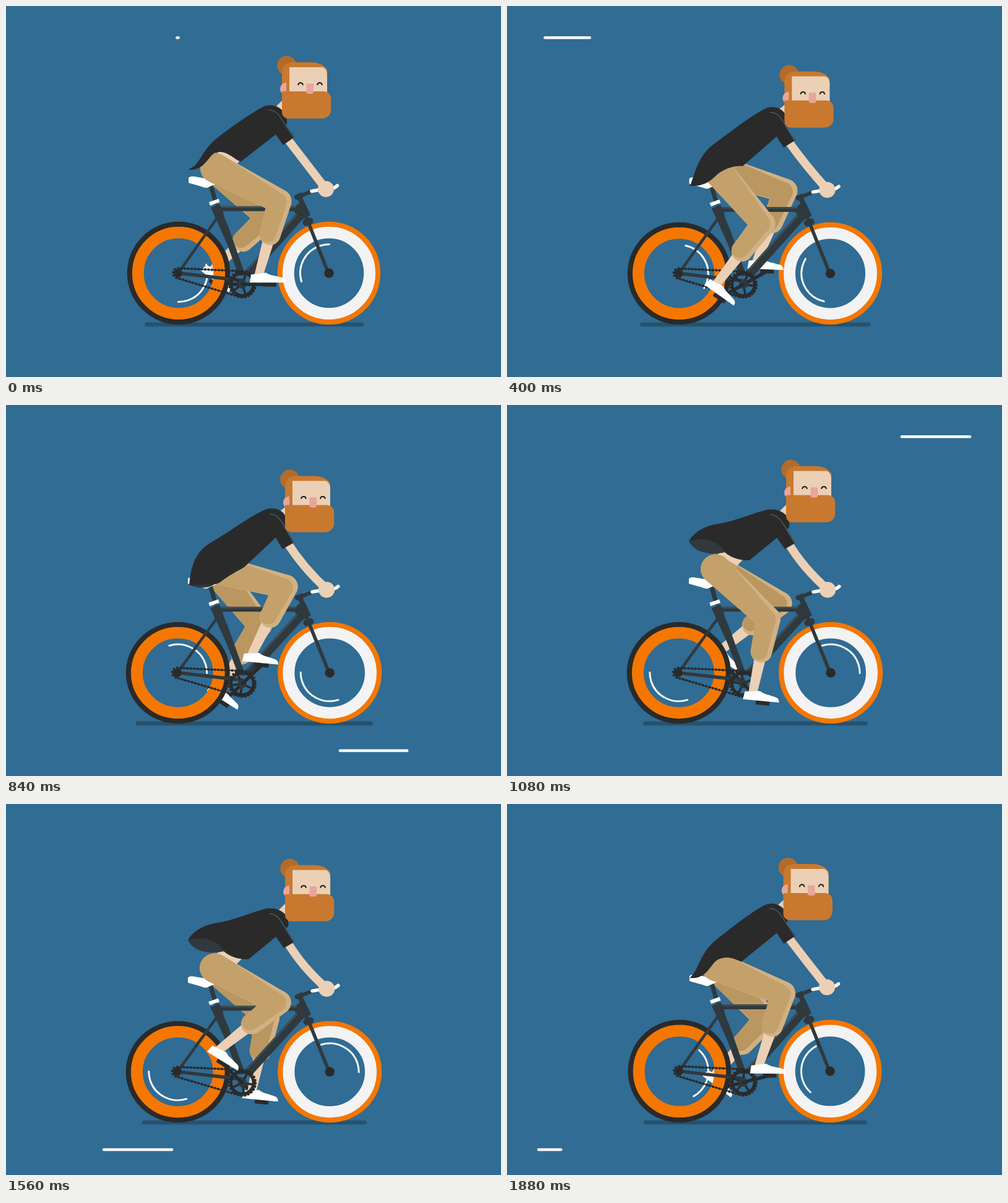
These frames come from a looping animation (800 px wide and 600 px high, 1.92 s). An HTML page with a canvas:

```html
<!DOCTYPE html>
<html lang="en">
<head>
<meta charset="utf-8">
<title>Cyclist</title>
<style>
html, body { margin: 0; height: 100%; overflow: hidden; background: #306c94; }
canvas { display: block; }
</style>
</head>
<body>
<canvas id="stage" width="800" height="600"></canvas>
<script>
const ctx = document.getElementById('stage').getContext('2d');
const { PI, sin, cos, atan2, acos, hypot, min, max } = Math;
const TAU = 2 * PI;
const BEAT = 480, LOOP = 1920;

const BLUE = '#306c94', SHADOW = '#28516b', WHITE = '#fff', PALE = '#f3f3f4';
const BLACK = '#2a2a2a', STEEL = '#2f393e', SHEEN = '#465359', ORANGE = '#f57700';
const SKIN = '#ebd0b5', PINK = '#e9a59b', HAIR = '#c8792f', BUN = '#b46b2a';
const KHAKI = '#c4a06a', FAR_KHAKI = '#ba9761', SEAM = '#d1b184';

const CRANK = { x: 382, y: 450 }, HIP = { x: 338, y: 262 };

// Three poses of each soft shape, at 0, 90 and 300 degrees of the beat
const SHIRT = [
  'M295 265C312 260 314 238 337 217C362 197 400 170 418 162C438 155 456 172 454 190L437 207L379 252C366 246 356 233 340 237C328 239 322 268 295 265Z',
  'M294 220C304 204 322 195 344 192C372 187 402 173 422 169C444 166 460 181 456 198L437 214L392 251C378 252 362 247 352 238C342 218 318 213 294 220Z',
  'M296 291C304 270 308 244 332 225C362 203 400 173 420 165C440 159 456 174 453 192L437 210L381 259C374 258 357 260 342 271C333 279 322 293 296 291Z'];
const LINING = [
  'M295 265C315 264 325 238 340 236L345 230L310 255Z',
  'M294 220C302 238 328 243 352 238L345 215L310 208Z',
  'M296 291C315 291 330 280 342 266L345 255L310 265Z'];
const SLEEVE = [
  'M426 167Q440 168 445 182L466 212L448 225L434 205Z',
  'M427 176Q440 178 447 192L466 223L449 233L435 213Z',
  'M426 171Q441 173 446 187L466 217L447 229L434 208Z'];
const FOLD = [
  'M424 168Q436 168 444 181L465 213',
  'M426 177Q438 178 445 190L465 223',
  'M425 172Q437 172 445 185L465 218'];
const ARM = [
  'M451 210Q485 254 517 296',
  'M454 222Q478 263 519 299',
  'M452 215Q483 259 518 297'];
const NECK = ['M440 176L466 150', 'M445 184L471 158', 'M441 182L467 160'];

function fill(color, path) {
  ctx.fillStyle = color;
  path ? ctx.fill(path) : ctx.fill();
}

function stroke(color, width, path, cap = 'round') {
  ctx.strokeStyle = color;
  ctx.lineWidth = width;
  ctx.lineCap = cap;
  path ? ctx.stroke(path) : ctx.stroke();
}

const draw = (d, color) => fill(color, new Path2D(d));
const line = (d, color, width, cap) => stroke(color, width, new Path2D(d), cap);

function disc(x, y, r, color) {
  ctx.beginPath();
  ctx.arc(x, y, r, 0, TAU);
  fill(color);
}

function arc(x, y, r, from, to, color, width) {
  ctx.beginPath();
  ctx.arc(x, y, r, from, to);
  stroke(color, width);
}

function box(x, y, w, h, radii, color) {
  ctx.beginPath();
  ctx.roundRect(x, y, w, h, radii);
  fill(color);
}

// Hull of two circles
function limb(a, ra, b, rb, color) {
  const dir = atan2(b.y - a.y, b.x - a.x);
  const lean = acos((ra - rb) / hypot(b.x - a.x, b.y - a.y));
  ctx.beginPath();
  ctx.arc(a.x, a.y, ra, dir + lean, dir - lean + TAU);
  ctx.arc(b.x, b.y, rb, dir - lean, dir + lean);
  ctx.closePath();
  fill(color);
}

// Sinusoid through the three poses, applied to every number in the path
function morph(poses, angle) {
  const c = cos(angle), s = sin(angle), rest = 1 - c - s;
  const weights = [c - 0.366 * rest, s + 0.634 * rest, 0.732 * rest];
  const numbers = poses.map(p => p.match(/\d+/g));
  let i = 0;
  return poses[0].replace(/\d+/g, () => {
    const v = weights.reduce((sum, w, k) => sum + w * numbers[k][i], 0);
    i++;
    return v.toFixed(2);
  });
}

function wheel(x, rim, tyre, highlight) {
  arc(x, 432, 79, 0, TAU, rim, 8.5);
  arc(x, 432, 65.7, 0, TAU, tyre, 18.8);
  arc(x, 432, 46.5, highlight, highlight + 0.6 * PI, PALE, 3);
}

function crankArm(turn) {
  const x = CRANK.x + 44 * cos(turn), y = CRANK.y + 44 * sin(turn);
  line(`M${CRANK.x} ${CRANK.y}L${x} ${y}`, BLACK, 5.5);
  return { x, y };
}

function leg(turn, cloth) {
  const pedal = crankArm(turn);
  const tilt = 0.332 * (1 - cos(turn));
  const ankle = {
    x: pedal.x - 17 * cos(tilt) + 17 * sin(tilt),
    y: pedal.y - 17 * sin(tilt) - 17 * cos(tilt)
  };
  const thigh = 117, shin = 122;
  const dx = ankle.x - HIP.x, dy = ankle.y - HIP.y, d = hypot(dx, dy);
  const swing = atan2(dy, dx) - acos((thigh ** 2 + d * d - shin ** 2) / (2 * thigh * d));
  const knee = { x: HIP.x + thigh * cos(swing), y: HIP.y + thigh * sin(swing) };
  const drop = atan2(ankle.y - knee.y, ankle.x - knee.x);
  const cuff = { x: knee.x + 56 * cos(drop), y: knee.y + 56 * sin(drop) };
  const behind = (p, angle) => ({ x: p.x - 4 * sin(angle), y: p.y + 4 * cos(angle) });

  limb(cuff, 9.5, ankle, 7, SKIN);
  ctx.save();
  ctx.translate(pedal.x, pedal.y);
  ctx.rotate(tilt);
  box(-11, -3, 22, 6.5, 1, BLACK);
  draw('M-32 -3L-30 -16Q-18 -17 -6 -19Q0 -15 8 -14L21 -11Q26 -9 26 -3Z', WHITE);
  ctx.restore();

  limb(HIP, 24, knee, 19.5, SEAM);
  limb(knee, 19.5, cuff, 17, SEAM);
  const innerKnee = behind(knee, (swing + drop) / 2);
  limb(HIP, 24, innerKnee, 15.5, cloth);
  limb(innerKnee, 15.5, behind(cuff, drop), 13.5, cloth);
}

function frame() {
  line('M331 290L339 318', STEEL, 7);
  line('M279 431L341 343', STEEL, 4.5);
  line('M279 432L382 444', STEEL, 5.5);
  line('M345 327.8L476 327.8', STEEL, 8);
  line('M348 325.3L470 325.3', SHEEN, 2);
  line('M477 337L390 435', STEEL, 14, 'butt');
  line('M470 337L390 427', SHEEN, 2);
  draw('M331 326L345 320L351 333Q352 342 359 356L387 436L376 436L357 384Z', STEEL);
  line('M329 320L344.5 314.5', WHITE, 6, 'butt');
  draw('M470 321L482 316L492 338L478 346L466 333Z', STEEL);
  line('M485 341L521 432', STEEL, 5.5);
  line('M485 350L491 348', STEEL, 11);
  disc(522, 432, 7.7, BLACK);
  draw('M295 278Q297 275 303 275.5L335 281L341 287L325 294Q321 294.5 316 292L295 286Z', WHITE);
  line('M478 318L474 308', STEEL, 8);
  line('M470 309L477 306', STEEL, 8);
  line('M474 308L493 300', STEEL, 6);
  line('M494 299.5L508 297Q528 298 535.5 290.5', WHITE, 5.5);
}

function drivetrain(t, turn) {
  disc(278, 432, 7, BLACK);
  ctx.setLineDash([0, 5.5]);
  ctx.lineDashOffset = -132 * t / 960;
  ctx.beginPath();
  ctx.arc(CRANK.x, CRANK.y, 21, -1.53, 1.86);
  ctx.arc(278, 432, 8, 1.86, 4.75);
  ctx.closePath();
  stroke(BLACK, 4.2);
  arc(CRANK.x, CRANK.y, 21, 0, TAU, BLACK, 4.2);
  ctx.setLineDash([]);
  line('M278 424L383 429M276 440L376 470', BLACK, 1.6);
  arc(CRANK.x, CRANK.y, 18, 0, TAU, BLACK, 4.5);
  for (let i = 0; i < 5; i++) {
    const a = turn + i * TAU / 5;
    line(`M${CRANK.x} ${CRANK.y}l${18 * cos(a)} ${18 * sin(a)}`, BLACK, 3.5);
  }
  disc(CRANK.x, CRANK.y, 7, STEEL);
}

function head(beat) {
  ctx.save();
  ctx.translate(5 - 5 * cos(beat), 15.7 - 15.7 * cos(beat) - 8.2 * sin(beat));
  disc(453.7, 96.5, 15.6, BUN);
  draw('M446 150V107Q447 91 466 91H492Q511 91 519 103V140H446Z', HAIR);
  draw('M458 99H512Q519 102 519 111V142H458Z', SKIN);
  ctx.beginPath();
  ctx.arc(453, 134, 10, PI / 2, PI * 1.5);
  fill(PINK);
  box(446, 138, 79.3, 44, [0, 12, 14, 10], HAIR);
  box(485.5, 125.5, 11.5, 16.5, [1, 1, 3, 3], PINK);
  for (const x of [476, 507]) arc(x, 128, 3.8, PI * 1.05, PI * 1.95, '#1c1c1c', 2);
  ctx.restore();
}

function streak(t) {
  const p = t % BEAT, n = t / BEAT | 0;
  const x = [278, 756.5, 747.5, 267.5][n], y = n % 2 ? 559 : 51.3;
  const front = x - 0.9 * min(p, 240), back = x - 0.9 * max(0, p - 240);
  line(`M${front - 0.6} ${y}H${back + 0.6}`, WHITE, 4.6);
}

function render(now) {
  const t = now % LOOP;
  const beat = TAU * t / BEAT, turn = beat / 2;
  const soft = poses => morph(poses, beat);

  ctx.fillStyle = BLUE;
  ctx.fillRect(0, 0, 800, 600);
  streak(t);

  const half = 183.4 - 9.8 * cos(beat) - 5.3 * sin(beat);
  line(`M${401.3 - half} 515H${401.3 + half}`, SHADOW, 6.4);

  const sag = (1 - cos(beat)) / 2;
  const squash = () => {
    ctx.save();
    ctx.translate(401, 515);
    ctx.scale(1 + 0.02 * sag, 1 - 0.026 * sag);
    ctx.translate(-401, -515);
  };

  squash();
  wheel(522, ORANGE, PALE, beat + 0.9 * PI);
  leg(turn + PI, FAR_KHAKI);
  wheel(279, BLACK, ORANGE, beat - 0.1 * PI);
  frame();
  drivetrain(t, turn);
  draw('M338 242L348 230L382 246L370 259Z', SKIN);
  ctx.restore();

  draw(soft(LINING), STEEL);
  squash();
  leg(turn, KHAKI);
  draw('M318 250L325 243Q333 236 341 238L373 257L365 267L330 270Z', KHAKI);
  ctx.restore();

  line(soft(NECK), SKIN, 24, 'butt');
  draw(soft(SHIRT), BLACK);
  line(soft(ARM), SKIN, 13.5);
  squash();
  disc(517, 296, 13, SKIN);
  ctx.restore();
  draw(soft(SLEEVE), BLACK);
  line(soft(FOLD), '#51616a', 1.2);
  head(beat);
}

const start = performance.now();
function tick() {
  render(performance.now() - start);
  requestAnimationFrame(tick);
}
tick();
</script>
</body>
</html>
```
